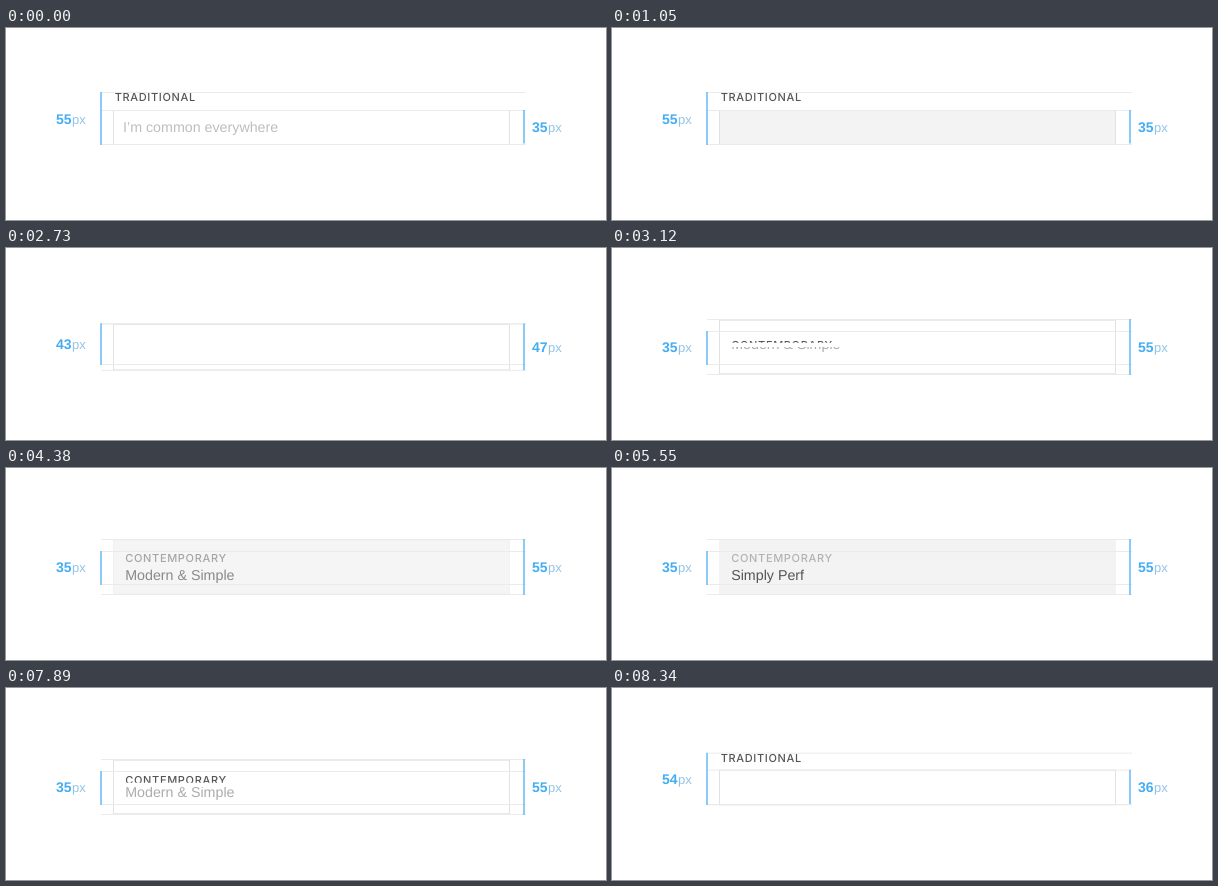
These frames come from a looping animation (600 by 192 pixels, 8.37 s). An HTML page:

```html
<!DOCTYPE html>
<html lang="en">
<head>
<meta charset="utf-8">
<title>Input field styles</title>
<style>
  html, body { margin: 0; width: 100%; height: 100%; overflow: hidden; background: #fff; }
  svg { display: block; width: 600px; height: 192px; }
  text { white-space: pre; text-rendering: geometricPrecision; }
  .input { font: 14.25px "Liberation Sans", Arial, sans-serif; fill: #555; }
  .label { font: 500 11px Inter, sans-serif; letter-spacing: .65px; fill: #555; }
  .num { font: bold 14px "Liberation Sans", Arial, sans-serif; fill: #45adf2; }
  .unit { font: 13px "Liberation Sans", Arial, sans-serif; fill: #92c4e8; }
  .guide { stroke: #ebebeb; }
  .bar { stroke: #66b9f4; stroke-width: 1.5; }
</style>
</head>
<body>
<svg viewBox="0 0 600 192">
  <defs>
    <clipPath id="clipTop"><rect x="100" y="60" width="200" height="15"/></clipPath>
    <clipPath id="clipLabel"><rect x="110" y="80" width="200" height="14.8"/></clipPath>
    <clipPath id="clipHint"><rect x="110" y="99" width="200" height="20"/></clipPath>
  </defs>

  <rect id="field" x="107.5" width="396"/>
  <line id="guideLeft" class="guide" x1="95" x2="520"/>
  <line id="guideBase" class="guide" x1="95" x2="520" y1="116.5" y2="116.5"/>
  <line id="guideTop" class="guide" x1="95" x2="520"/>
  <line id="guideBottom" class="guide" x1="95" x2="520"/>
  <line id="barLeft" class="bar" x1="95" x2="95" y2="117"/>
  <line id="barRight" class="bar" x1="518" x2="518"/>

  <g id="sizeLeft"><text id="numLeft" class="num" x="50"></text><text class="unit" x="66">px</text></g>
  <g transform="translate(0 104)"><text id="numRight" class="num" x="526"></text><text class="unit" x="542">px</text></g>

  <g clip-path="url(#clipTop)"><text id="oldLabel" class="label" x="108.7" y="73">TRADITIONAL</text></g>
  <text id="oldHint" class="input" x="117" y="104">I’m common everywhere</text>
  <g id="oldEntry">
    <text id="oldValue" class="input" x="117" y="104"></text>
    <rect id="selection" x="117" y="90" width="57" height="17" fill="#48aef6" fill-opacity=".4"/>
  </g>

  <g clip-path="url(#clipLabel)"><text id="newLabel" class="label" x="119.3" y="94">CONTEMPORARY</text></g>
  <g clip-path="url(#clipHint)"><text id="newHint" class="input" x="119.2" y="112">Modern &amp; Simple</text></g>
  <text id="newValue" class="input" x="119.2" y="112"></text>
</svg>

<script>
const LOOP = 8370, STEP = 30;
const el = {};
document.querySelectorAll('svg [id]').forEach(node => el[node.id] = node);

const span = (t, from, to) => Math.min(1, Math.max(0, (t - from) / (to - from)));
const mix = (a, b, k) => a + (b - a) * k;
const sine = k => (1 - Math.cos(Math.PI * k)) / 2;
const easeIn = k => k * k;
const easeOut = k => k * (2 - k);
const gray = v => `rgb(${v},${v},${v})`;
const during = (t, from, to) => t >= from && t < to;

function set(node, attrs) {
  for (const name in attrs) node.setAttribute(name, attrs[name]);
}

// Each run types its text one letter per interval.
function typed(t, runs) {
  return runs.map(([text, start, every]) =>
    text.slice(0, Math.max(0, Math.floor((t - start) / every) + 1))).join('');
}

function drawField(t, morph, focusOld, focusNew) {
  const top = mix(82.5, 71.5, morph), bottom = mix(116.5, 126.5, morph);
  const left = mix(64.5, 83.5, morph);
  const boxTop = mix(82.5, 72.2, morph), boxBottom = mix(116.5, 125.8, morph);
  set(el.field, {
    y: boxTop, height: boxBottom - boxTop,
    fill: gray(mix(255, 243, Math.max(focusOld, focusNew))),
    stroke: gray(mix(226, 243, focusNew))
  });
  set(el.guideTop, { y1: top, y2: top });
  set(el.guideBottom, { y1: bottom, y2: bottom });
  set(el.guideLeft, { y1: left, y2: left });
  set(el.barLeft, { y1: left - .5 });
  set(el.barRight, { y1: top - .5, y2: mix(115.5, 127, morph) });
  set(el.sizeLeft, { transform: `translate(0 ${mix(96, 104, morph)})` });

  const delta = Math.round(20 * morph);
  el.numLeft.textContent = 55 - delta;
  el.numRight.textContent = 35 + delta;
}

function drawOld(t) {
  const hidden = t < 5000 ? easeIn(span(t, 2250, 2520)) : 1 - easeOut(span(t, 8130, 8400));
  set(el.oldLabel, { transform: `translate(0 ${11 * hidden})` });
  set(el.oldHint, {
    opacity: t < 1050 ? 1 : 0,
    style: `fill:${gray(mix(190, 150, span(t, 210, 360)))}`
  });
  el.oldValue.textContent = typed(t, [['and ', 1170, 60], ['OLD', 1500, 90]]);
  set(el.oldEntry, { opacity: 1 - span(t, 2220, 2430) });
  set(el.selection, { opacity: t >= 2100 ? 1 : 0 });
}

function drawNew(t, focus) {
  const hidden = t < 5000 ? 1 - easeOut(span(t, 3060, 3360)) : easeIn(span(t, 7780, 8050));
  set(el.newLabel, {
    transform: `translate(0 ${11 * hidden})`,
    style: `fill:${gray(mix(85, 178, focus))}`
  });
  set(el.newHint, {
    transform: `translate(0 ${-17 * hidden})`,
    opacity: t < 4830 ? 1 : span(t, 7350, 7650),
    style: `fill:${gray(mix(172, 132, focus))}`
  });
  el.newValue.textContent = typed(t, [['Simply ', 4920, 60], ['Perfect', 5370, 60]]);
  set(el.newValue, { opacity: 1 - span(t, 7110, 7380) });
}

function draw(t) {
  const morph = sine(span(t, 2280, 3090)) - sine(span(t, 7890, 8400));
  const focusOld = span(t, 210, 360) - span(t, 2220, 2520);
  const focusNew = sine(span(t, 3810, 4560)) - sine(span(t, 7080, 7830));
  drawField(t, morph, focusOld, focusNew);
  drawOld(t);
  drawNew(t, focusNew);
}

const start = performance.now();
function tick() {
  const t = (performance.now() - start) % LOOP;
  draw(Math.floor(t / STEP) * STEP);
  requestAnimationFrame(tick);
}
tick();
</script>
</body>
</html>
```
